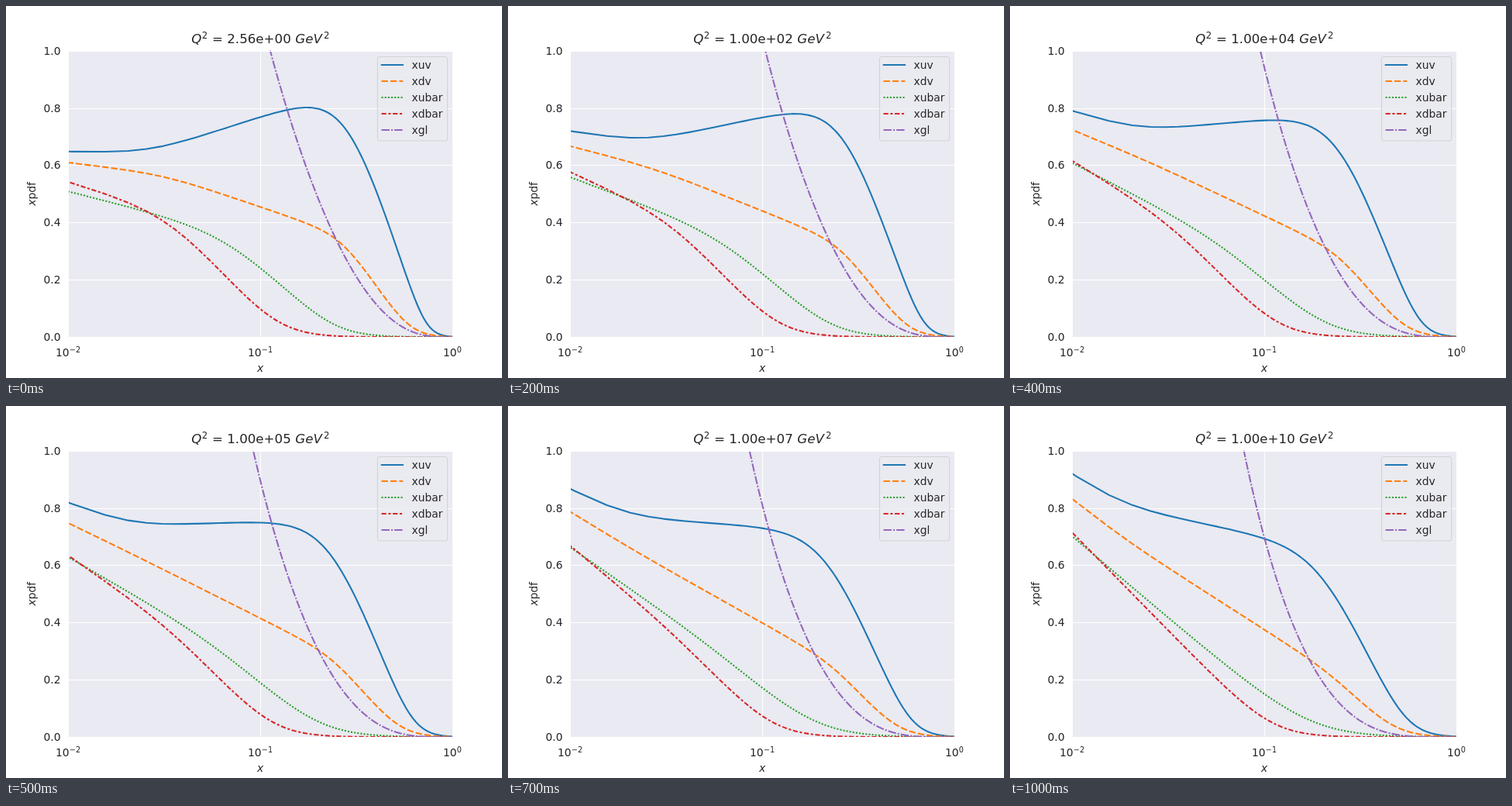
Recreate the animation shown at these times as an HTML page. Size 640 by 480 pixels, loop 1100 ms.

```html
<!DOCTYPE html>
<html lang="en">
<head>
<meta charset="utf-8">
<title>Parton densities</title>
<style>
  html, body { margin: 0; width: 100%; height: 100%; overflow: hidden; background: #fff; }
  svg { display: block; width: 640px; height: 480px; }
  text { font: 13.89px "DejaVu Sans", sans-serif; fill: #262626; white-space: pre; }
  .title text { font-size: 16.67px; }
  .it, .title .it { font-style: italic; }
  .sup { font-size: 9.72px; }
  .title .sup { font-size: 11.67px; }
  .grid { stroke: #fff; stroke-width: 1.1; }
  .line { fill: none; stroke-width: 2.083; stroke-linejoin: round; }
</style>
</head>
<body>
<svg viewBox="0 0 640 480">
  <clipPath id="axes"><rect x="80" y="57.6" width="496" height="369.6"/></clipPath>
  <rect x="80" y="58" width="496" height="369" fill="#eaeaf2"/>
  <g id="ticks"></g>
  <g id="curves" clip-path="url(#axes)"></g>
  <rect x="80.5" y="58.5" width="496" height="369" fill="none" stroke="#fff"/>
  <g class="title">
    <text class="it" x="239.3" y="48">Q</text>
    <text class="sup" x="252.8" y="41.7">2</text>
    <text id="scale" x="266" y="48"></text>
    <text class="it" x="373.3" y="48">GeV</text>
    <text class="sup" x="410" y="41.7">2</text>
  </g>
  <text class="it" x="328" y="472" text-anchor="middle">x</text>
  <text transform="translate(38 257.8) rotate(-90)"><tspan class="it">x</tspan>pdf</text>
  <rect x="479.4" y="65.5" width="90.2" height="108.5" rx="2.8" fill="#eaeaf2" fill-opacity=".8" stroke="#ccc" stroke-opacity=".8"/>
  <g id="legend"></g>
</svg>
<script>
const BOTTOM = 427.2, HEIGHT = 369.6, RIGHT = 576, DECADE = 248, LINE = 2.083;
const $ = id => document.getElementById(id);

function add(parent, tag, attrs, text = '') {
  const el = document.createElementNS('http://www.w3.org/2000/svg', tag);
  for (const key in attrs) el.setAttribute(key, attrs[key]);
  el.textContent = text;
  return parent.appendChild(el);
}

// Height of a line with rounded corners: each bend is [slope change, position, roundness].
const bends = (px, list) => list.reduce((h, [slope, at, round]) =>
  h + slope * round * Math.log1p(Math.exp((at - px) / round)), 0);

// Height of a power law: [value at x = 0.1, power of x, power of 1 - x].
function power(px, [[value, a, b]]) {
  const x = Math.min(1, 10 ** ((px - RIGHT) / DECADE));
  return HEIGHT * value * (x / 0.1) ** a * ((1 - x) / 0.9) ** b;
}

// Each shape moves from its parameters at the lowest scale to those at the highest.
const curves = [
  { name: 'xuv', color: '#1f77b4', dash: [], shape: bends,
    from: [[3.15, 542, 9.3], [-3.48, 440, 23], [0.35, 185, 25]],
    to: [[2.2, 511.5, 17], [-2, 400, 27], [0.5, 138, 28]] },
  { name: 'xdv', color: '#ff7f0e', dash: [4, 1.5], shape: bends,
    from: [[1.5, 522, 14], [-1.16, 434, 16], [-0.22, 203, 25]],
    to: [[1, 497, 20], [-0.36, 412, 18], [0.15, 145, 25]] },
  { name: 'xubar', color: '#2ca02c', dash: [1, 1], shape: bends,
    from: [[1, 424, 24], [-0.75, 288, 35]],
    to: [[0.82, 390, 36], [0.03, 250, 35]] },
  { name: 'xdbar', color: '#d62728', dash: [3, 1.25, 1.5, 1.25], shape: bends,
    from: [[1.15, 352, 25], [-0.85, 212, 30]],
    to: [[1.02, 339, 26], [0, 212, 30]] },
  { name: 'xgl', color: '#9467bd', dash: [5, 1, 1, 1], shape: power,
    from: [[1.134, -0.646, 3.415]],
    to: [[0.698, -0.986, 5]] }
];

// Progress slows down as the scale q = log10(Q²) grows from 0.408 to 10.
const evo = q => Math.log(q + 14);
const progress = q => (evo(q) - evo(0.408)) / (evo(10) - evo(0.408));
const mix = (from, to, s) => from.map((bend, i) =>
  bend.map((v, j) => v + (to[i][j] - v) * s));

// Even steps in x on the logarithmic axis, run in from the left edge so the dashes start there.
const samples = [-1, ...Array.from({ length: 199 }, (_, k) =>
  RIGHT + DECADE * Math.log10(0.0005 + (k + 1) * 0.9995 / 199))];

function pathOf({ shape, from, to }, s) {
  const params = mix(from, to, s);
  const points = samples.map(px => [px, BOTTOM - Math.max(0, shape(px, params))]);
  const entry = points.findIndex(p => p[1] > -1);
  return 'M' + points.slice(Math.max(0, entry - 1))
    .map(p => p.map(v => v.toFixed(2)).join()).join('L');
}

for (let i = 0; i <= 5; i++) {
  const y = BOTTOM - i * HEIGHT / 5;
  if (i % 5) add($('ticks'), 'path', { class: 'grid', d: `M80 ${Math.round(y) + 0.5}H576` });
  add($('ticks'), 'text', { x: 70.5, y: Math.round(y + 5), 'text-anchor': 'end' }, (i / 5).toFixed(1));
}
add($('ticks'), 'path', { class: 'grid', d: 'M328.5 58V427' });
[['−2', 64], ['−1', 312], ['0', 564]].forEach(([exponent, x]) => {
  add($('ticks'), 'text', { x, y: 452 }, '10');
  add($('ticks'), 'text', { class: 'sup', x: x + 17.8, y: 446.7 }, exponent);
});

curves.forEach((c, i) => {
  const y = 76 + 21 * i;
  const look = {
    class: 'line', stroke: c.color,
    'stroke-dasharray': c.dash.map(v => v * LINE).join(' ') || 'none',
    'stroke-linecap': c.dash.length ? 'butt' : 'round'
  };
  c.path = add($('curves'), 'path', look);
  add($('legend'), 'path', { ...look, d: `M484.5 ${y}h27.8` });
  add($('legend'), 'text', { x: 523.5, y: y + 5 }, c.name);
});

let shown = -1;
function draw() {
  const step = Math.floor(performance.now() / 100) % 11;
  if (step !== shown) {
    shown = step;
    $('scale').textContent = step ? '= 1.00e+' + String(step).padStart(2, '0') : '= 2.56e+00';
    const s = progress(step || 0.408);
    curves.forEach(c => c.path.setAttribute('d', pathOf(c, s)));
  }
  requestAnimationFrame(draw);
}
draw();
</script>
</body>
</html>
```
